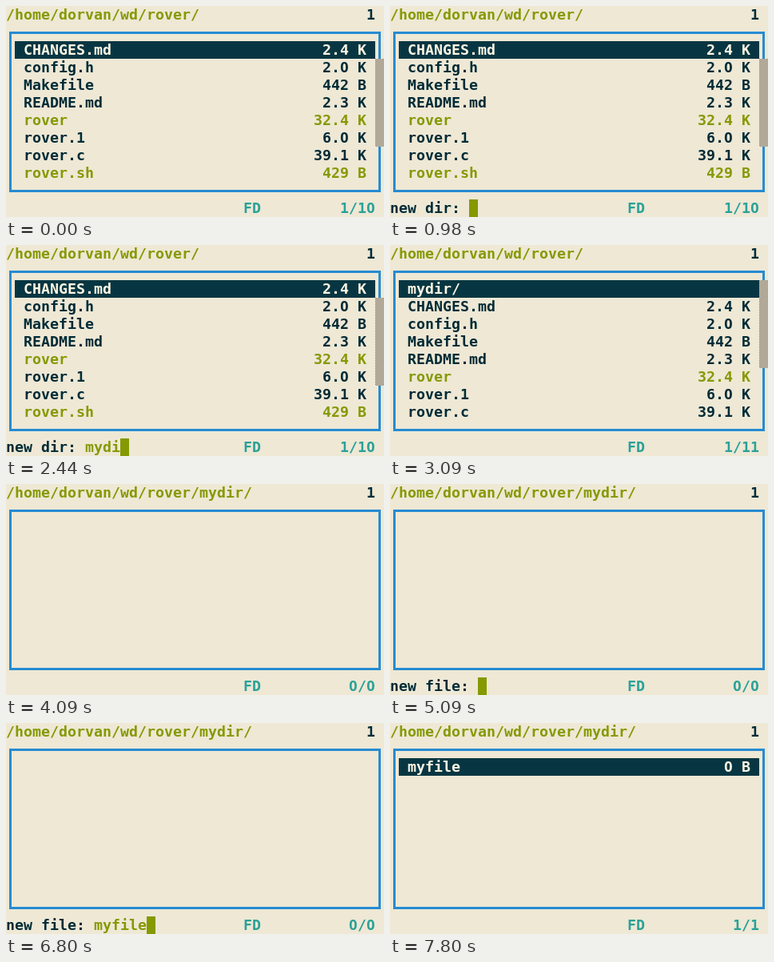
Write an HTML page with a canvas that moves like this. It is 473 px wide and 264 px high and loops after 8000 ms.

```html
<!DOCTYPE html>
<html lang="en">
<head>
<meta charset="utf-8">
<title>File browser in a terminal</title>
<style>
  html, body { margin: 0; width: 100%; height: 100%; overflow: hidden; background: #eee8d5; }
  canvas { display: block; width: 473px; height: 264px; }
</style>
</head>
<body>
<canvas id="term" width="473" height="264"></canvas>
<script>
const CW = 11, CH = 22, COLS = 43, BASELINE = 17, LOOP = 8000;
const C = {
  bg: '#eee8d5', dark: '#002b36', select: '#073642', light: '#fdf6e3',
  green: '#859900', blue: '#268bd2', cyan: '#2aa198', bar: '#75695a'
};
const MONO = 'bold 18.27px "DejaVu Sans Mono", monospace';
const ZERO = 'bold 18px "Open Sans", sans-serif'; // plain zero without a dot

const ctx = document.getElementById('term').getContext('2d');
ctx.textAlign = 'center';

const HOME = '/home/dorvan/wd/rover/';
const FILES = [
  ['CHANGES.md', '2.4 K'], ['config.h', '2.0 K'], ['Makefile', '442 B'],
  ['README.md', '2.3 K'], ['rover', '32.4 K', true], ['rover.1', '6.0 K'],
  ['rover.c', '39.1 K'], ['rover.sh', '429 B', true]
];

// bar: first row of the scroll bar
const VIEWS = [
  { at: 0, path: HOME, files: FILES, count: '1/10', bar: 3 },
  { at: 3090, path: HOME, files: [['mydir/', ''], ...FILES.slice(0, 7)], count: '1/11', bar: 2 },
  { at: 4090, path: HOME + 'mydir/', files: [], count: '0/0' },
  { at: 7800, path: HOME + 'mydir/', files: [['myfile', '0 B']], count: '1/1' }
];

// keys: the time of each typed letter
const PROMPTS = [
  { from: 980, to: 3090, label: 'new dir: ', word: 'mydir', keys: [1550, 1930, 2230, 2440, 2520] },
  { from: 5090, to: 7800, label: 'new file: ', word: 'myfile', keys: [5610, 6080, 6300, 6470, 6730, 6800] }
];

function cells(col, row, w, h, color) {
  ctx.fillStyle = color;
  ctx.fillRect(col * CW, row * CH, w * CW, h * CH);
}

function print(text, col, row, color) {
  ctx.fillStyle = color;
  [...text].forEach((ch, i) => {
    ctx.font = ch === '0' ? ZERO : MONO;
    ctx.fillText(ch, (col + i + 0.5) * CW, row * CH + BASELINE);
  });
}

const printRight = (text, end, row, color) => print(text, end - text.length, row, color);

function makeChecker() {
  const tile = document.createElement('canvas');
  tile.width = tile.height = 2;
  const t = tile.getContext('2d');
  t.fillStyle = C.bg;
  t.fillRect(0, 0, 2, 2);
  t.fillStyle = C.bar;
  t.fillRect(0, 0, 1, 1);
  t.fillRect(1, 1, 1, 1);
  return ctx.createPattern(tile, 'repeat');
}
const checker = makeChecker();

function drawView(view) {
  cells(0, 0, COLS, 12, C.bg);
  print(view.path, 0, 0, C.green);
  print('1', 41, 0, C.dark);

  ctx.strokeStyle = C.blue;
  ctx.lineWidth = 3;
  ctx.strokeRect(5.5, 33.5, 462, 198);
  if (view.bar) cells(42, view.bar, 1, 5, checker);

  view.files.forEach(([name, size, exec], i) => {
    const row = i + 2;
    if (i === 0) cells(1, row, 41, 1, C.select);
    const color = i === 0 ? C.light : exec ? C.green : C.dark;
    print(name, 2, row, color);
    printRight(size, 41, row, color);
  });

  print('FD', 27, 11, C.cyan);
  printRight(view.count, 42, 11, C.cyan);
}

function drawPrompt({ label, word, keys }, t) {
  const typed = word.slice(0, keys.filter(k => k <= t).length);
  print(label, 0, 11, C.dark);
  print(typed, label.length, 11, C.green);
  cells(label.length + typed.length, 11, 1, 1, C.green);
}

function render(t) {
  drawView(VIEWS.filter(v => v.at <= t).pop());
  const prompt = PROMPTS.find(p => t >= p.from && t < p.to);
  if (prompt) drawPrompt(prompt, t);
}

const start = performance.now();
function tick() {
  render((performance.now() - start) % LOOP);
  requestAnimationFrame(tick);
}
tick();
</script>
</body>
</html>
```
